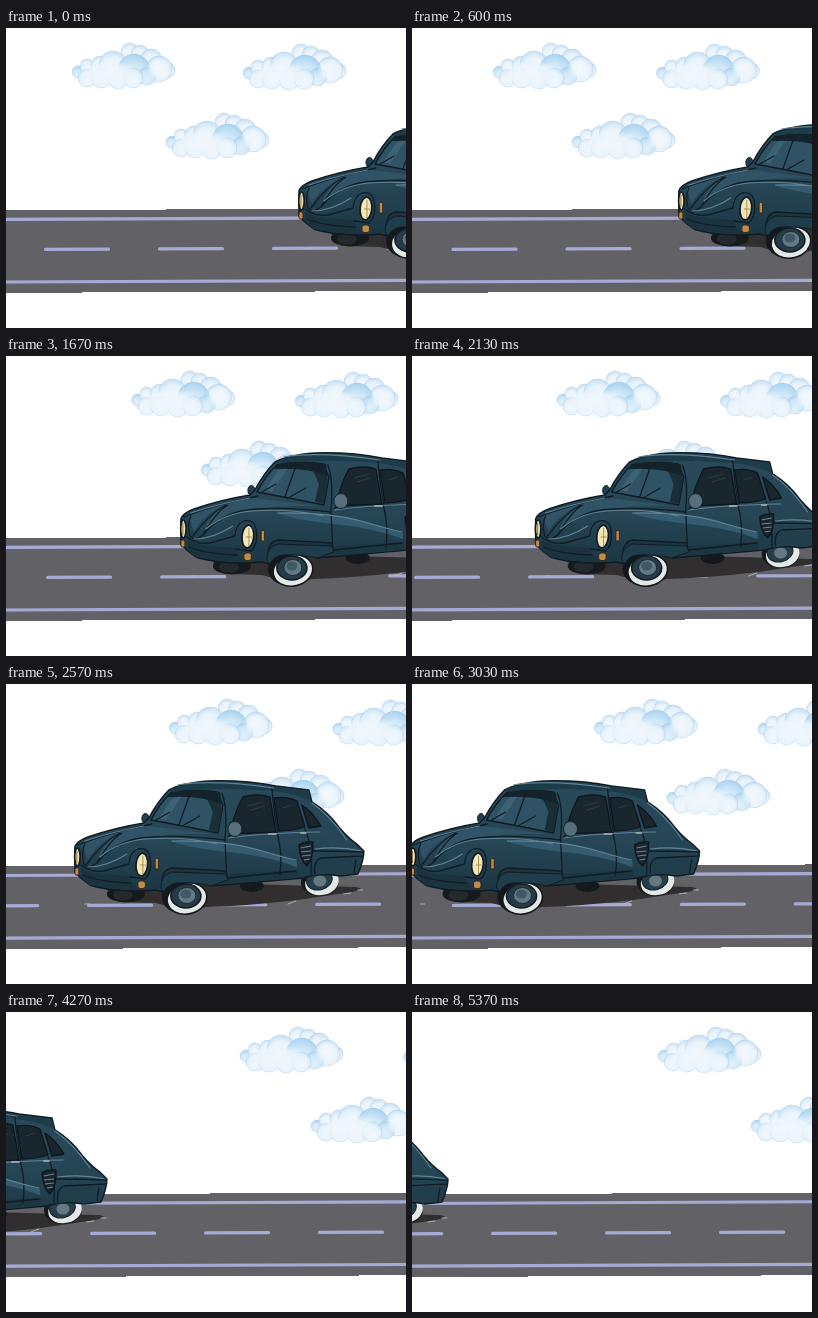
An HTML page that plays this animation: 400x300 px, repeating every 5.43 s.

```html
<!DOCTYPE html>
<html lang="en">
<head>
<meta charset="utf-8">
<title>Car on a road</title>
<style>
  html, body { margin: 0; width: 100%; height: 100%; overflow: hidden; background: #fff; }
  svg { display: block; width: 400px; height: 300px; }
  .mark { stroke: #a6abd5; stroke-width: 3.2; stroke-linecap: round; }
  .ink { fill: none; stroke: #101d25; stroke-width: 1.3; stroke-linecap: round; stroke-linejoin: round; }
  .shine { fill: none; stroke: #5f8394; stroke-width: 1.1; stroke-linecap: round; }
  .glass { fill: #2f5365; stroke: #101b22; stroke-width: 1.5; stroke-linejoin: round; }
  .dark { fill: #19262e; stroke: #0d161c; stroke-width: 1.3; stroke-linejoin: round; }
  .lamp { fill: #f2e6b6; stroke: #141c1f; stroke-width: 1.7; }
  .amber { fill: #c18a45; stroke: #2a221a; stroke-width: .9; }
</style>
</head>
<body>
<svg viewBox="0 0 400 300">
  <defs>
    <radialGradient id="puff" cx=".5" cy=".6" r=".62">
      <stop offset="0" stop-color="#f4f9fd"/>
      <stop offset=".6" stop-color="#e8f3fb"/>
      <stop offset="1" stop-color="#c3def5"/>
    </radialGradient>
    <radialGradient id="blue" cx=".45" cy=".7" r=".72">
      <stop offset="0" stop-color="#e4f2fb"/>
      <stop offset=".55" stop-color="#cfe7f7"/>
      <stop offset="1" stop-color="#a6d2ef"/>
    </radialGradient>
    <radialGradient id="mist">
      <stop offset="0" stop-color="#f2f8fd"/>
      <stop offset=".6" stop-color="#eef6fc" stop-opacity=".85"/>
      <stop offset="1" stop-color="#e6f2fb" stop-opacity="0"/>
    </radialGradient>
    <linearGradient id="paint" x1="0" y1="0" x2="0" y2="1">
      <stop offset="0" stop-color="#294a5a"/>
      <stop offset=".55" stop-color="#264656"/>
      <stop offset="1" stop-color="#1c3643"/>
    </linearGradient>
    <g id="cloud"></g>
  </defs>

  <use class="cloud" href="#cloud"/>
  <use class="cloud" href="#cloud"/>
  <use class="cloud" href="#cloud"/>

  <g id="road"></g>

  <g id="car">
    <path fill="#302e2f" d="M100 205L200 199L350 203Q361 205 346 208L292 216Q240 222 200 223L184 228L150 219L116 218Z"/>
    <path stroke="#b9b8b8" stroke-width=".9" stroke-linecap="round" d="M79 220H83M282 220L290 217M338 210L345 209M352 206H357"/>
    <ellipse cx="120" cy="210" rx="19" ry="8.5" fill="#171a1d"/>
    <ellipse cx="117" cy="211" rx="10" ry="5.5" fill="#23292d"/>
    <ellipse cx="246" cy="202" rx="12" ry="6" fill="#15191c"/>

    <g id="rear">
      <ellipse cx="314" cy="198" rx="19" ry="14" fill="#14191c"/>
      <ellipse cx="316" cy="198.5" rx="17" ry="12.5" fill="#e4e8e6" transform="rotate(-14 316 198)"/>
      <ellipse cx="313.5" cy="196" rx="13" ry="10" fill="#263d4a" stroke="#131d23" transform="rotate(-14 313 196)"/>
      <ellipse cx="314" cy="197" rx="6.5" ry="5.5" fill="#667982"/>
    </g>

    <ellipse cx="139.5" cy="134.5" rx="3.5" ry="5" fill="#223f4d" stroke="#101d25"/>
    <path fill="url(#paint)" stroke="#0f1c24" stroke-width="1.5" stroke-linejoin="round"
      d="M69 163Q71 157 82 153Q108 144 138 139L143 134Q152 117 163 106Q176 99 203 97Q240 96 270 102L303 106L306 118Q322 128 333 143Q342 154 351 160L358 167Q358 176 352 190L335 192Q314 188 298 194L205 202Q198 195 180 196Q162 198 158 208L150 206Q130 208 110 206Q92 204 84 201L76 195L69 188Z"/>
    <path fill="#1e3b49" d="M164 106Q178 99 203 98Q240 98 270 103L303 107L305 117Q280 106 250 106Q205 103 164 109Z"/>
    <path fill="#305466" d="M76 159Q105 148 140 142L207 150Q168 149 137 154Q110 158 92 175Q98 158 114 149Q91 158 82 176Z"/>
    <path fill="#1a333f" d="M75 183Q84 190 98 190L124 192Q126 202 134 206Q110 206 84 201L76 195Z"/>
    <path fill="#345b6f" d="M164 157Q215 155 252 165Q278 173 291 177L291 183Q258 171 222 168Q184 164 164 157Z"/>
    <path fill="#1b3541" d="M157 190Q159 185 167 185L220 188L222 197L205 201Q198 194 180 195Q163 196 158 204ZM222 190L292 186V194L222 200Z"/>
    <path fill="#203e4c" d="M309 179Q313 175 324 176L354 174L350 189L335 191Q318 188 307 192Z"/>

    <path class="glass" d="M145 136Q154 119 165 109Q186 105 211 108L217 121L212 149Q178 142 145 136Z"/>
    <path fill="#3d6274" d="M153 134L167 114L176 112L160 136Z"/>
    <path fill="#1a2e38" d="M200 112L215 116L216 126L212 148L203 146L207 128Z"/>
    <path fill="#14232b" d="M165 109Q190 103 214 108L216 120Q194 111 162 113Z"/>
    <path class="ink" d="M184 110L173 141M150 136L164 128M178 141L194 132"/>
    <path class="dark" d="M224 150Q228 129 237 113Q252 109 264 113L270 148Z"/>
    <path class="dark" d="M268 114Q281 112 291 117L299 143Q286 147 273 147Z"/>
    <path class="dark" d="M296 121Q307 128 315 142L303 144Z"/>
    <path d="M242 122L257 118M245 126L259 122M277 124L286 121" stroke="#2b3d47" fill="none"/>
    <path class="ink" d="M216 109Q222 125 219 154L221 195M271 148Q277 169 274 191M299 145Q307 162 305 190M266 104Q268 130 272 148"/>
    <path class="shine" d="M222 154Q258 149 314 148M172 101Q205 95 268 104M306 119Q325 132 341 156"/>

    <path class="ink" d="M114 149Q97 158 81 180M116 149Q104 156 91 179M79 160Q75 168 78 180L83 184L91 179M91 179Q111 154 145 153Q178 151 219 156M75 181Q85 189 98 187L123 180Q124 168 132 165Q142 163 144 172Q147 188 139 195L124 193M77 191Q94 198 125 199M72 161Q104 148 146 140"/>
    <path class="shine" d="M79 157Q106 148 138 142M94 173Q113 157 140 155Q180 152 211 160M166 157Q215 156 249 165Q276 173 290 176M82 183Q101 183 121 170M309 165Q333 162 356 167"/>
    <path class="ink" d="M156 203Q155 186 166 184L220 187M222 194L290 187M309 190Q307 177 315 174L357 172M350 176L348 189M306 167Q333 167 357 168"/>

    <ellipse class="lamp" cx="71.5" cy="173" rx="2.7" ry="9"/>
    <path d="M71 167V179" stroke="#88723f"/>
    <ellipse class="lamp" cx="136" cy="180.5" rx="5.8" ry="11.5" transform="rotate(5 136 180)"/>
    <path d="M137 172V190M134 181H140" stroke="#927c43" stroke-width=".8"/>
    <rect class="amber" x="149.3" y="174.5" width="3.4" height="10.5" rx="1.2"/>
    <rect class="amber" x="132" y="197" width="7.5" height="7.5" rx="2.5"/>
    <rect class="amber" x="69" y="184" width="4" height="7" rx="1.5"/>

    <path class="dark" d="M293 161Q299 157 307 158Q308 174 301 182Q294 176 293 161Z"/>
    <path d="M295 164L305 162M295 168L305 167M296 172L305 171M298 176L304 175" stroke="#748690" stroke-width="1.1"/>
    <path d="M263 150H270M295 149H300" stroke="#a9b6bb" stroke-width="1.7" stroke-linecap="round"/>
    <path class="ink" d="M222 153L227 149"/>
    <ellipse cx="229" cy="145" rx="7" ry="7.5" fill="#566f7a" stroke="#15232b"/>

    <g id="front">
      <ellipse cx="177" cy="213" rx="21" ry="17" fill="#12181b"/>
      <ellipse cx="181" cy="214.5" rx="20" ry="15.5" fill="#e4e8e6" stroke="#14191c" stroke-width="1.6" transform="rotate(-12 181 214)"/>
      <ellipse cx="180" cy="212" rx="15" ry="12" fill="#243c49" stroke="#121b20" stroke-width="1.6"/>
      <ellipse cx="181" cy="211.5" rx="9" ry="8" fill="#667982" stroke="#1b2931"/>
      <ellipse cx="180" cy="210" rx="5.5" ry="4.5" fill="#3f5865"/>
    </g>
    <path fill="#1f3d4b" stroke="#101d25" d="M155 204Q155 191 166 188L220 190L222 196L205 202Q190 198 171 199Q162 200 158 208Z"/>
  </g>
</svg>
<script>
const LOOP = 5430;
const DASH = 114;
const $ = id => document.getElementById(id);

// Puffs of one cloud: x, y, radius, fill
const puffs = [
  [58, 9, 9, 'puff'], [68, 11, 9, 'puff'], [79, 17, 11, 'puff'], [95, 27, 8, 'puff'],
  [87, 26, 13, 'puff'], [6, 29, 6, 'blue'], [15, 23, 7, 'puff'], [15, 35, 9, 'puff'],
  [28, 22, 9, 'puff'], [41, 22, 14, 'puff'], [29, 35, 10, 'puff'],
  [62, 27, 16, 'blue'], [75, 33, 9, 'blue'], [46, 36, 10, 'puff'], [61, 35, 10, 'puff']
];
const circle = ([x, y, r, fill]) =>
  `<circle cx="${x}" cy="${y}" r="${r}" fill="url(#${fill})" stroke="#9cc4ec" stroke-width=".6" stroke-opacity=".6"/>`;
$('cloud').innerHTML = puffs.map(circle).join('') +
  '<ellipse cx="37" cy="31" rx="32" ry="14" fill="url(#mist)"/>' +
  '<ellipse cx="87" cy="26" rx="13" ry="12" fill="url(#mist)"/>';

// The road leans up to the right by one pixel in 233.
const lean = (x, y) => (y - x / 233).toFixed(3);
const line = (a, b, y) =>
  `<line class="mark" x1="${a}" y1="${lean(a, y)}" x2="${b}" y2="${lean(b, y)}"/>`;
const L = -240, R = 480, TOP = 182.19, BOTTOM = 264.83;
let road = `<path fill="#626165" shape-rendering="crispEdges" d="M${L} ${lean(L, TOP)}L${R} ${lean(R, TOP)}V${lean(R, BOTTOM)}L${L} ${lean(L, BOTTOM)}Z"/>`;
road += line(L, R, 191.3) + line(L, R, 254);
for (let x = 39.5 - 2 * DASH; x < R; x += DASH) road += line(x, x + 63, 221.6);
$('road').innerHTML = road;

// Each track lists time and distance; the curve between is smooth and never overshoots.
function track(points) {
  const n = points.length;
  const gap = i => points[i + 1][0] - points[i][0];
  const rate = i => (points[i + 1][1] - points[i][1]) / gap(i);
  const slope = points.map((p, i) => {
    if (i === 0) return rate(0) * .4;
    if (i === n - 1) return rate(n - 2) * .5;
    const a = rate(i - 1), b = rate(i);
    return a * b <= 0 ? 0 : 2 * a * b / (a + b);
  });
  return t => {
    if (t <= points[0][0]) return points[0][1];
    if (t >= points[n - 1][0]) return points[n - 1][1];
    let i = 0;
    while (t > points[i + 1][0]) i++;
    const h = gap(i), u = (t - points[i][0]) / h, v = 1 - u;
    return points[i][1] * v * v * (1 + 2 * u) + points[i + 1][1] * u * u * (3 - 2 * u) +
      h * u * v * (slope[i] * v - slope[i + 1] * u);
  };
}

const carX = track([[0, 224], [1070, 166.5], [1670, 106], [2570, 0], [3470, -141], [4270, -257], [5370, -322], [5430, -323]]);
const roadX = track([[570, 0], [1070, 53], [1670, 116], [2570, 271], [3470, 407], [4270, 502], [5370, 611], [5430, 617]]);
// The road repeats every dash, so it only slides half a dash either way.
const wrap = x => (x + DASH / 2) % DASH - DASH / 2;
const glide = (start, end) => t => 180 * Math.min(1, Math.max(0, (t - start) / (end - start)));
const clouds = [
  { x: 66, y: 15, move: glide(240, 4560) },
  { x: 237, y: 16, move: glide(420, 4740) },
  { x: 160, y: 85, move: track([[600, 0], [1070, 18], [1670, 35], [2570, 75], [3470, 113], [4270, 145], [5370, 179]]) }
];
const sprites = document.querySelectorAll('.cloud');
const place = (el, x, y = 0) => el.setAttribute('transform', `translate(${x.toFixed(2)} ${y})`);

const start = performance.now();
function draw() {
  const t = (performance.now() - start) % LOOP;
  clouds.forEach((c, i) => place(sprites[i], c.x + c.move(t), c.y));
  place($('road'), wrap(roadX(t)));
  place($('car'), carX(t));
  requestAnimationFrame(draw);
}
draw();
</script>
</body>
</html>
```
